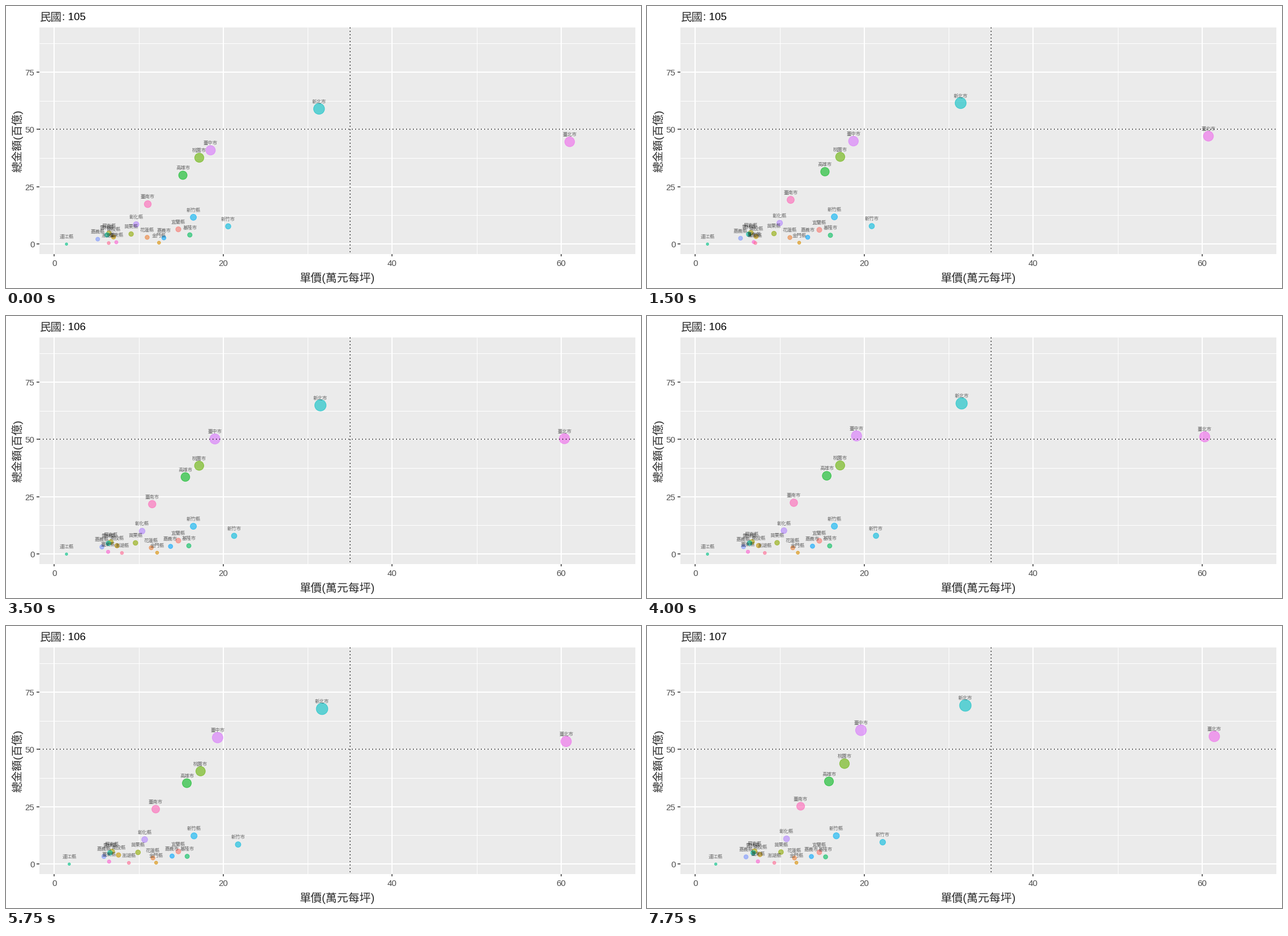
A matplotlib script that plays this animation: 1122 by 499 pixels, repeating every 8000 ms.

```python
import numpy as np
import matplotlib.pyplot as plt
from matplotlib.animation import FuncAnimation
from matplotlib.patches import Circle, Rectangle

W, H, DPI = 1122, 499, 100
FRAMES, INTERVAL = 32, 250
PX = 72 / DPI                      # points per pixel
KEYS = (0, 19, 31)                 # frames where the data is pinned
LEFT, RIGHT, TOP, BOTTOM = 59, 1112, 38, 439
INK = "#2B2B2B"

plt.rcParams["font.family"] = ["Liberation Sans", "Noto Sans CJK JP"]

# name, unit price at the keys, total amount at the keys
CITIES = [
    ("宜蘭縣", (14.64, 14.64, 14.64), (6.5, 5.75, 5.2)),
    ("花蓮縣", (10.95, 11.6, 11.7), (3.0, 2.75, 2.7)),
    ("金門縣", (12.35, 12.05, 11.93), (0.65, 0.65, 0.65)),
    ("南投縣", (6.97, 7.53, 7.61), (3.15, 3.9, 4.25)),
    ("屏東縣", (6.43, 6.72, 6.97), (4.8, 5.5, 5.7)),
    ("苗栗縣", (9.05, 9.75, 10.1), (4.45, 5.1, 5.3)),
    ("桃園市", (17.12, 17.1, 17.62), (37.75, 38.95, 43.9)),
    ("高雄市", (15.18, 15.58, 15.78), (30.1, 35.0, 36.15)),
    ("基隆市", (16.0, 15.84, 15.38), (4.05, 3.55, 3.2)),
    ("連江縣", (1.4, 1.4, 2.38), (0.05, 0.05, 0.05)),
    ("雲林縣", (6.2, 6.42, 6.8), (4.05, 5.0, 4.95)),
    ("新北市", (31.3, 31.52, 31.93), (59.1, 67.1, 69.3)),
    ("新竹市", (20.54, 21.5, 22.14), (7.8, 8.1, 9.6)),
    ("新竹縣", (16.42, 16.42, 16.65), (11.75, 12.35, 12.4)),
    ("嘉義市", (12.93, 14.0, 13.7), (2.75, 3.65, 3.35)),
    ("嘉義縣", (5.1, 5.77, 5.96), (2.2, 3.5, 3.2)),
    ("彰化縣", (9.65, 10.6, 10.76), (8.65, 10.6, 11.1)),
    ("臺中市", (18.46, 19.15, 19.57), (41.0, 53.65, 58.5)),
    ("臺北市", (60.97, 60.13, 61.4), (44.7, 52.5, 55.8)),
    ("臺東縣", (7.3, 5.98, 7.37), (0.85, 1.1, 1.2)),
    ("臺南市", (11.02, 11.73, 12.43), (17.5, 23.4, 25.3)),
    ("澎湖縣", (6.4, 8.52, 9.31), (0.5, 0.55, 0.6)),
]


def to_x(price):
    return 85.5 + 14.925 * price


def to_y(total):
    return 421 - 4.053 * total


def hcl(hue, chroma=100, lum=65):
    """Polar CIELUV to sRGB, clipped to gamut."""
    a = np.radians(hue)
    xn, yn, zn = 0.95047, 1.0, 1.08883
    d = xn + 15 * yn + 3 * zn
    u = chroma * np.cos(a) / (13 * lum) + 4 * xn / d
    v = chroma * np.sin(a) / (13 * lum) + 9 * yn / d
    y = ((lum + 16) / 116) ** 3
    x = y * 9 * u / (4 * v)
    z = y * (12 - 3 * u - 20 * v) / (4 * v)
    m = np.array([[3.2406, -1.5372, -0.4986],
                  [-0.9689, 1.8758, 0.0415],
                  [0.0557, -0.2040, 1.0570]])
    c = np.clip(m @ (x, y, z), 0, 1)
    return tuple(np.where(c <= 0.0031308, 12.92 * c,
                          1.055 * c ** (1 / 2.4) - 0.055))


fig = plt.figure(figsize=(W / DPI, H / DPI), dpi=DPI, facecolor="white")
ax = fig.add_axes([0, 0, 1, 1])
ax.set_xlim(0, W)
ax.set_ylim(H, 0)
ax.axis("off")


def line(xs, ys, color, width, z=1, **kw):
    ax.plot(xs, ys, color=color, lw=width * PX, zorder=z,
            solid_capstyle="butt", dash_capstyle="butt", **kw)


def text(x, y, s, size, color="black", z=4, **kw):
    return ax.text(x, y, s, fontsize=size * PX, color=color, zorder=z,
                   va="baseline", **kw)


def vline(price, *style, **kw):
    line([to_x(price)] * 2, [TOP, BOTTOM], *style, **kw)


def hline(total, *style, **kw):
    line([LEFT, RIGHT], [to_y(total)] * 2, *style, **kw)


# panel, grid and axes
ax.add_patch(Rectangle((LEFT, TOP), RIGHT - LEFT, BOTTOM - TOP,
                       fc="#EBEBEB", ec="none", zorder=0))
for p in (10, 30, 50):
    vline(p, "white", 1)
for t in (12.5, 37.5, 62.5, 87.5):
    hline(t, "white", 1)
for p in (0, 20, 40, 60):
    vline(p, "white", 2)
    line([to_x(p)] * 2, [BOTTOM, BOTTOM + 4], "#333333", 1.5)
    text(to_x(p), 460.5, str(p), 15, "#4D4D4D", ha="center")
for t in (0, 25, 50, 75):
    hline(t, "white", 2)
    line([LEFT - 5, LEFT], [to_y(t)] * 2, "#333333", 1.5)
    text(50.5, to_y(t) + 6, str(t), 15, "#4D4D4D", ha="right")
vline(35, "black", 1.5, z=5, ls=(0, (1, 3)))
hline(50, "black", 1.5, z=5, ls=(0, (1, 3)))

text(585.5, 488, "單價(萬元每坪)", 20, INK, ha="center")
text(26.5, 238.5, "總金額(百億)", 19.5, INK, ha="center",
     rotation=90, rotation_mode="anchor")
text(59.5, 25.5, "民國", 19.5, INK)
year = text(99, 25, "", 18.8)

dots, labels = [], []
for i, (name, _, _) in enumerate(CITIES):
    color = hcl(15 + 360 * i / len(CITIES)) + (0.6,)
    dots.append(ax.add_patch(Circle((0, 0), 1, fc=color, ec=color,
                                    lw=PX, zorder=3)))
    labels.append(text(0, 0, name, 8.4, (0, 0, 0, 0.55), ha="center"))


def update(frame):
    year.set_text(f": {105 + round((frame + 1) / 19.8)}")
    for (_, prices, totals), dot, label in zip(CITIES, dots, labels):
        total = np.interp(frame, KEYS, totals)
        x, y = to_x(np.interp(frame, KEYS, prices)), to_y(total)
        dot.set_center((x + 0.5, y + 0.5))
        dot.set_radius(2 + np.sqrt(total))
        label.set_position((x + 0.5, y - 9.8))
    return [year, *dots, *labels]


anim = FuncAnimation(fig, update, frames=FRAMES, interval=INTERVAL,
                     init_func=lambda: update(0), repeat=True)
plt.show()
```
